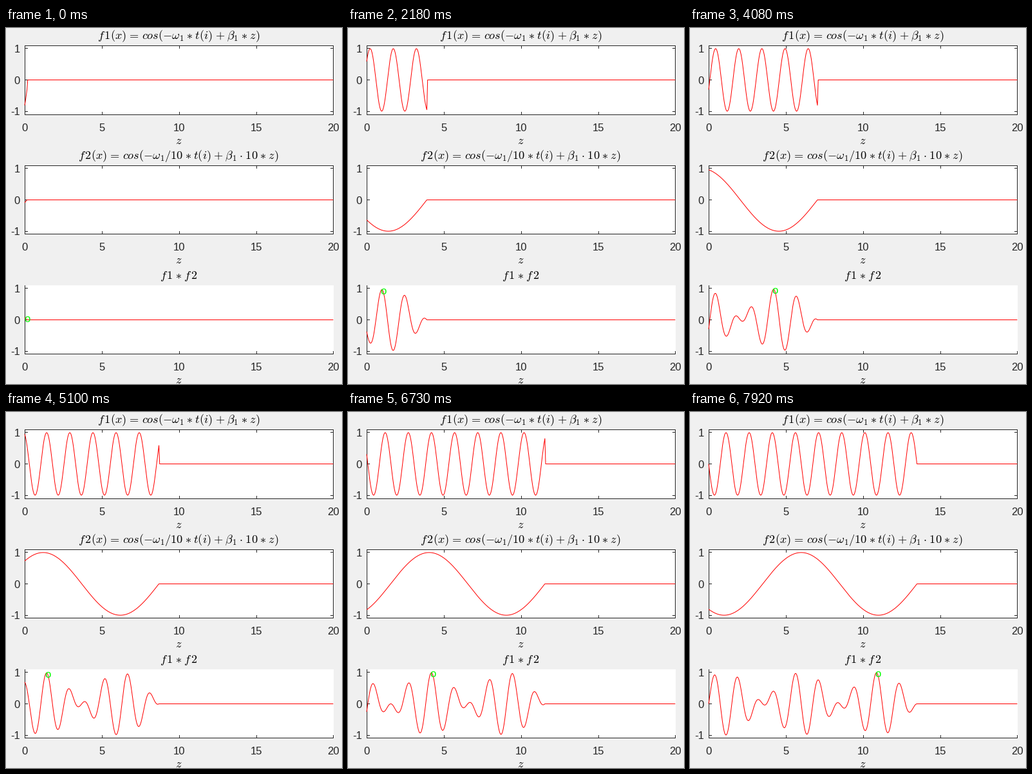
Recreate the animation shown at these times as a matplotlib script. Size 522x552 px, loop 7990 ms.

```python
import numpy as np
import matplotlib.pyplot as plt
from matplotlib.animation import FuncAnimation
from matplotlib.patches import Rectangle

W, H, DPI = 522, 552, 100
LOOP, INTERVAL = 7990, 17
PX = 72 / DPI                     # points per pixel
AXIS = "#262626"
LEFT, RIGHT = 29, 508             # pixel columns of the side lines
UNIT = 48.6                       # pixels per unit of height
TOPS = (27, 213, 399)             # pixel rows
BOTTOMS = (134, 319, 505)
ZEROS = (80.5, 266.5, 452.5)
TICK = 4

# TeX-like spacing around operators and after slanted letters
GAP = r"\hspace{0.053}"
AST = GAP + r"\ast" + GAP
DOT = GAP + r"\cdot" + GAP
PLUS = GAP + "+" + GAP
EQUALS = r"\hspace{0.116}=\hspace{0.116}"
F = r"f\hspace{0.123}"
Z = r"z\hspace{0.05}"
TITLES = (
    rf"${F}1(x){EQUALS}cos(-\omega_1{AST}t(i){PLUS}\beta_1{AST}{Z})$",
    rf"${F}2(x){EQUALS}cos(-\omega_1/10{AST}t(i)"
    rf"{PLUS}\beta_1{DOT}10{AST}{Z})$",
    rf"${F}1{AST}{F}2$",
)

# Bursts of evenly spaced updates: first ms, last ms, count
BURSTS = (
    (70, 380, 5), (550, 780, 4), (930, 1010, 2), (1160, 1560, 6),
    (1710, 1710, 1), (1860, 2260, 6), (2420, 2970, 8), (3120, 3120, 1),
    (3290, 3440, 3), (3600, 3600, 1), (3760, 4230, 7), (4380, 4620, 4),
    (4790, 5400, 9), (5570, 5570, 1), (5720, 5950, 4), (6100, 6580, 7),
    (6730, 6730, 1), (6880, 7060, 3), (7210, 7920, 10),
)
DROPPED = {4, 20, 36, 41, 63, 76}  # simulation steps that are never shown
TIMES = np.concatenate([[0]] + [np.linspace(*b) for b in BURSTS])
STEPS = [k for k in range(1, 91) if k not in DROPPED]

DT, DZ = 0.15, 0.05
z = np.arange(401) * DZ

plt.rcParams["font.family"] = "Liberation Sans"
plt.rcParams["mathtext.fontset"] = "cm"

fig = plt.figure(figsize=(W / DPI, H / DPI), dpi=DPI, facecolor="#f0f0f0")
ax = fig.add_axes([0, 0, 1, 1])
ax.set_xlim(0, W)
ax.set_ylim(H, 0)
ax.axis("off")


def to_x(value):
    return 29 + 23.97 * value


def stroke(xs, ys):
    # Whole numbers snap to the centre of that pixel row or column
    ax.plot(xs, ys, color=AXIS, lw=PX, solid_capstyle="projecting", zorder=2)


def label(x, y, text, size=16.67, color=AXIS, ha="center"):
    return ax.text(x, y, text, fontsize=size * PX, color=color, ha=ha,
                   va="baseline", zorder=4)


def draw_panel(top, bottom, zero, title, boxed):
    ax.add_patch(Rectangle((LEFT, top), RIGHT - LEFT + 1, bottom - top + 1,
                           fc="white", lw=0, zorder=1))
    stroke([LEFT, LEFT], [top, bottom])
    stroke([LEFT, RIGHT], [bottom, bottom])
    if boxed:
        stroke([RIGHT, RIGHT], [top, bottom])
        stroke([LEFT, RIGHT], [top, top])

    for value in (0, 5, 10, 15, 20):
        column = round(to_x(value))
        stroke([column, column], [bottom, bottom - TICK])
        if boxed:
            stroke([column, column], [top, top + TICK])
        label(to_x(value), bottom + 26, str(value))

    for value in (-1, 0, 1):
        y = zero - UNIT * value
        row = int(y)
        stroke([LEFT, LEFT + TICK], [row, row])
        if boxed:
            stroke([RIGHT, RIGHT - TICK], [row, row])
        label(21.6, y + 6.3, str(value), ha="right")

    label(268.5, top - 9.8, title, 18.3, "black")
    label(268.5, bottom + 45.8, "$z$", 18.3, "black")


for i in range(3):
    draw_panel(TOPS[i], BOTTOMS[i], ZEROS[i], TITLES[i], i < 2)

curves = [ax.plot([], [], color="red", lw=PX, zorder=3,
                  solid_joinstyle="round", solid_capstyle="butt")[0]
          for _ in ZEROS]
marker = label(0, 0, "o", color="#00ff00", ha="left")


def waves(t):
    reached = z <= t + 1e-9
    fast = np.where(reached, np.sin(2 * np.pi * (z / 1.5 - t)), 0)
    slow = np.where(reached, np.sin(2 * np.pi * (z - t) / 10), 0)
    return fast, slow, fast * slow


def update(frame):
    now = frame * INTERVAL + INTERVAL - 1
    shown = np.searchsorted(TIMES, now, side="right") - 1
    signals = waves(STEPS[shown] * DT)
    for curve, zero, signal in zip(curves, ZEROS, signals):
        curve.set_data(to_x(z), zero - UNIT * signal)

    # The letter hangs just behind the highest point of the product
    product = np.round(signals[2], 9)
    peak = int(np.argmax(product))
    marker.set_position((to_x(z[max(peak - 2, 0)]) - 0.3,
                         ZEROS[2] - UNIT * product[peak] + 7))
    return [*curves, marker]


def init():
    return update(0)


anim = FuncAnimation(fig, update, frames=LOOP // INTERVAL, init_func=init,
                     interval=INTERVAL, repeat=True, repeat_delay=0)
plt.show()
```
